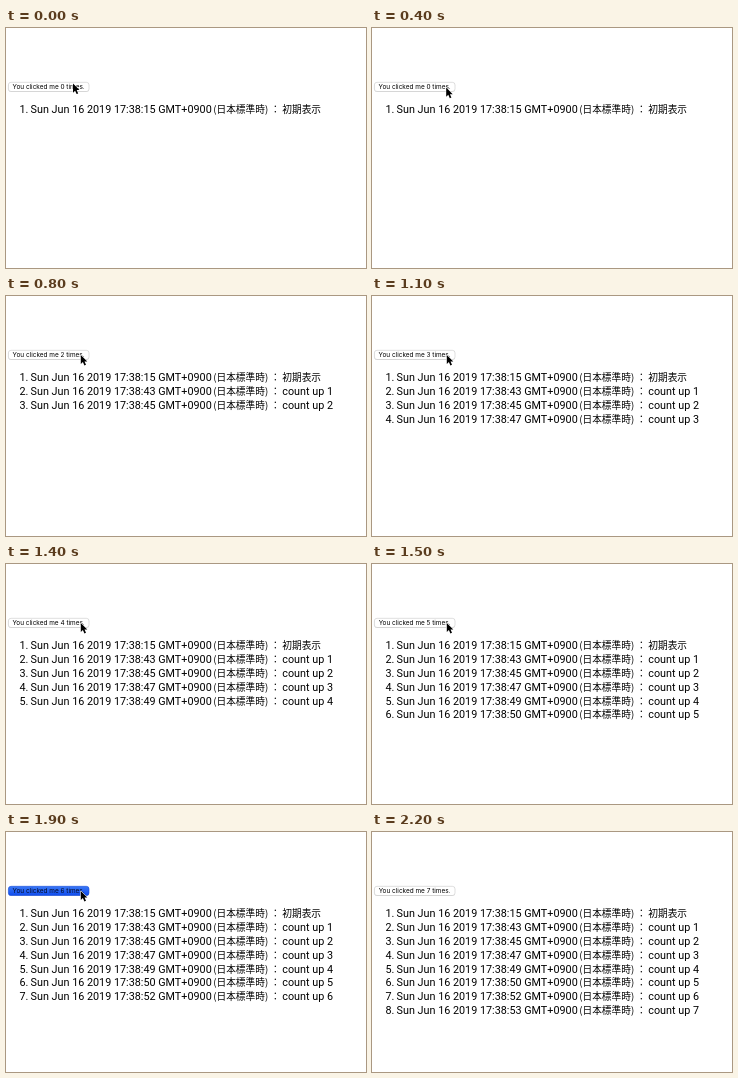
Write an HTML page that moves like this. It is 360 px wide and 240 px high and loops after 2400 ms.

```html
<!DOCTYPE html>
<html lang="ja">
<head>
<meta charset="utf-8">
<title>Click counter log</title>
<style>
  html, body { margin: 0; width: 100%; height: 100%; overflow: hidden; background: #fff; }
  svg { display: block; width: 100vw; height: 100vh; }
  .latin { font: 10.8px Roboto, Arial, sans-serif; }
  .kanji { font: 9.7px "Noto Sans CJK JP", "Noto Sans CJK", sans-serif; }
  .label { font: 6.45px Inter, Arial, sans-serif; }
</style>
</head>
<body>
<svg viewBox="0 0 360 240" xmlns="http://www.w3.org/2000/svg">
  <defs>
    <linearGradient id="blue" x2="0" y2="1">
      <stop offset="0" stop-color="#3a78f5"/>
      <stop offset="1" stop-color="#0f4cee"/>
    </linearGradient>
  </defs>
  <rect width="360" height="240" fill="#fff"/>
  <rect x="2.4" y="54.7" width="80.6" height="9.2" rx="2.6" fill="#d4d4d4"/>
  <rect id="button" x="2.4" y="54.3" width="80.6" height="9.2" rx="2.6" stroke-width=".6"/>
  <text id="caption" class="label" x="42.6" y="61.3" text-anchor="middle"></text>
  <g id="log"></g>
  <path id="cursor" d="M0 0V9.2L2.1 7.2L3.6 10.6L5.2 9.9L3.7 6.6H6.5Z"
        fill="#000" stroke="#fff" stroke-width="1" paint-order="stroke"/>
</svg>
<script>
  const LOOP = 2400;
  const SECONDS = [15, 43, 45, 47, 49, 50, 52, 53];
  const CLICKS = [500, 800, 1100, 1400, 1500, 1800, 2000];
  const PRESSES = [[1700, 1800], [1900, 2000]];
  const HIDE_CURSOR = 2200;
  // time, x, y of the pointer tip
  const POINTER = [
    [0, 67, 55.5], [100, 69, 56.5], [200, 71, 57.7], [300, 73, 58.8],
    [400, 74.2, 59.6], [500, 74.2, 55.2], [800, 74.8, 58.9]
  ];

  const byId = id => document.getElementById(id);
  const button = byId('button'), caption = byId('caption');
  const log = byId('log'), cursor = byId('cursor');

  function addText(parent, cls, x, y, text) {
    const el = document.createElementNS('http://www.w3.org/2000/svg', 'text');
    el.setAttribute('class', cls);
    el.setAttribute('x', x);
    el.setAttribute('y', y);
    el.textContent = text;
    parent.appendChild(el);
  }

  const rows = SECONDS.map((sec, i) => {
    const row = document.createElementNS('http://www.w3.org/2000/svg', 'g');
    const y = 84.8 + i * 13.93;
    addText(row, 'latin', 13.5, y, `${i + 1}.`);
    addText(row, 'latin', 24.6, y, `Sun Jun 16 2019 17:38:${sec} GMT+0900`);
    addText(row, 'kanji', 207.2, y, '(日本標準時)');
    addText(row, 'kanji', 264.4, y, '：');
    addText(row, i ? 'latin' : 'kanji', 276.3, y, i ? `count up ${i}` : '初期表示');
    log.appendChild(row);
    return row;
  });

  function draw(t) {
    const count = CLICKS.filter(at => t >= at).length;
    const pressed = PRESSES.some(([from, to]) => t >= from && t < to);
    const [, x, y] = POINTER.filter(p => t >= p[0]).pop();

    caption.textContent = `You clicked me ${count} times.`;
    caption.setAttribute('fill', pressed ? '#020b2c' : '#000');
    button.setAttribute('fill', pressed ? 'url(#blue)' : '#fff');
    button.setAttribute('stroke', pressed ? '#1a50dc' : '#c9c9c9');
    rows.forEach((row, i) => row.setAttribute('visibility', i <= count ? 'visible' : 'hidden'));
    cursor.setAttribute('transform', `translate(${x} ${y})`);
    cursor.setAttribute('visibility', t < HIDE_CURSOR ? 'visible' : 'hidden');
  }

  const start = performance.now();
  function tick() {
    draw((performance.now() - start) % LOOP);
    requestAnimationFrame(tick);
  }
  tick();
</script>
</body>
</html>
```
